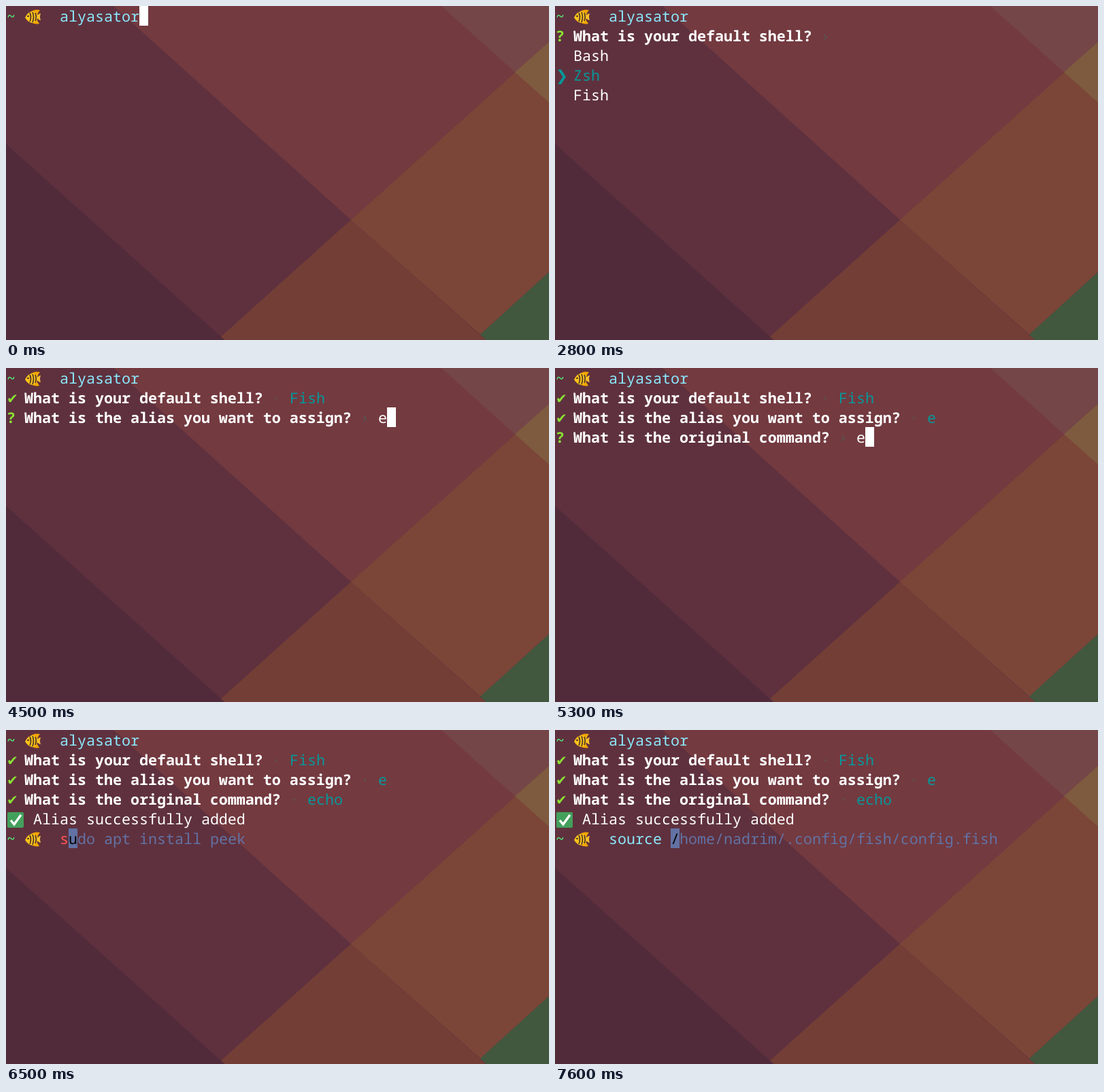
Recreate the animation shown at these times as an HTML page. Size 798 by 492 pixels, loop 8000 ms.

```html
<!DOCTYPE html>
<html lang="en">
<head>
<meta charset="utf-8">
<title>Terminal</title>
<style>
  html, body { margin: 0; width: 100%; height: 100%; overflow: hidden; background: #5f313e; }
  svg { display: block; width: 798px; height: 492px; }
  text {
    font: 500 21.667px "Noto Sans Mono", "DejaVu Sans Mono", monospace;
    font-variant-ligatures: none;
    text-rendering: geometricPrecision;
    white-space: pre;
    fill: #fff;
  }
  .bold { font-weight: 700; }
  .ok { fill: #8ae234; }
  .path { fill: #50fa7b; }
  .cmd { fill: #8be9fd; }
  .bad { fill: #ff5555; }
  .pick { fill: #06989a; }
  .dim { fill: #555753; font-weight: 400; }
  .ghost { fill: #6272a4; }
  .under { fill: #000; }
  .mark { font-family: "DejaVu Sans", sans-serif; font-weight: 400; }
  .tick { font-size: 20px; }
</style>
</head>
<body>
<svg viewBox="0 0 798 492" xmlns="http://www.w3.org/2000/svg">
  <defs>
    <g id="fish">
      <path d="M36 9Q41 4 50 6Q47 9 46 13L37 12Z" fill="#f2a600"/>
      <path d="M36 23Q42 28 49 26Q46 22 45 19Z" fill="#f2a600"/>
      <path d="M44 16Q48 11 51 11Q49 16 51 21Q48 21 44 16Z" fill="#fbc02d"/>
      <path d="M28 17Q32 8 40 8Q46 10 47 16Q45 23 39 25Q32 24 28 17Z" fill="#fcc21b"/>
      <g fill="none" stroke="#4a3328" stroke-width="1.7">
        <path d="M35 10Q38 16 35 23"/>
        <path d="M39 9Q42 16 39 24"/>
        <path d="M43 10Q45.500 16 43 22"/>
      </g>
      <circle cx="32.500" cy="15" r="1.300" fill="#3a2a24"/>
    </g>
    <g id="done">
      <rect x="2" y="121" width="24" height="23" rx="2" fill="#43a05c"/>
      <path d="M7 133L12 139L22 125" fill="none" stroke="#fff" stroke-width="3.400"/>
    </g>
  </defs>
  <g id="wall">
    <path d="M0 0H798V492H0Z" fill="#5f313e"/>
    <path d="M0 203L316 487L321.500 492H0Z" fill="#522b3b"/>
    <path d="M158 0H798V53L507 315Z" fill="#733a40"/>
    <path d="M640 0H798V53L748 97.500Z" fill="#754648"/>
    <path d="M316 487L507 315L705 492H321.500Z" fill="#733e36"/>
    <path d="M507 315L798 53V392L697 484Z" fill="#7b4638"/>
    <path d="M748 97.500L798 53V142Z" fill="#7e5b3f"/>
    <path d="M697 484L798 392V492H705.500Z" fill="#41583f"/>
  </g>
  <g id="screen"></g>
</svg>
<script>
const LOOP = 8000, CELL = 13, LINE = 29, LEFT = 1, BASE = 23;
const screen = document.getElementById('screen');
const items = [];

function add(tag, attrs, from = 0, to = LOOP) {
  const el = document.createElementNS('http://www.w3.org/2000/svg', tag);
  for (const key in attrs) el.setAttribute(key, attrs[key]);
  screen.append(el);
  items.push({ el, from, to });
  return el;
}

const colX = col => LEFT + col * CELL;

function put(row, col, str, cls, from, to) {
  add('text', { x: colX(col), y: row * LINE + BASE, class: cls }, from, to).textContent = str;
}

function cursor(row, col, from, to, fill = '#fff') {
  add('rect', { x: colX(col), y: row * LINE, width: CELL, height: LINE, fill }, from, to);
}

function prompt(row, from) {
  put(row, 0, '~', 'path', from);
  add('use', { href: '#fish', y: row * LINE }, from);
}

// A question with its pending and answered look
function ask(row, question, answer, from, answered) {
  const end = question.length + 3;
  put(row, 0, '?', 'ok bold', from, answered);
  put(row, 0, '✔', 'ok mark tick', answered);
  put(row, 2, question, 'bold', from);
  put(row, end, '›', 'dim', from, answered);
  put(row, end, '·', 'dim', answered);
  put(row, end + 2, answer, 'pick', answered);
  return end + 2;
}

// Typed answer: keys[i] is when character i appears
function type(row, col, str, from, keys, to) {
  [from, ...keys].forEach((start, n, all) => {
    const stop = all[n + 1] ?? to;
    put(row, col, str.slice(0, n), '', start, stop);
    cursor(row, col + n, start, stop);
  });
}

// Shell input with the suggested rest behind the cursor
function suggest(row, col, full, count, cls, from, to) {
  const at = col + count;
  put(row, col, full.slice(0, count), cls, from, to);
  cursor(row, at, from, to, '#6272a4');
  put(row, at, full[count], 'under', from, to);
  put(row, at + 1, full.slice(count + 1), 'ghost', from, to);
}

prompt(0, 0);
put(0, 6, 'alyasator', 'cmd');
cursor(0, 15, 0, 500);

ask(1, 'What is your default shell?', 'Fish', 500, 3400);
const shells = ['Bash', 'Zsh', 'Fish'];
const moves = [[500, 0], [1600, 1], [2600, 2], [2800, 1], [3100, 2]];
moves.forEach(([from, chosen], i) => {
  const to = moves[i + 1]?.[0] ?? 3400;
  shells.forEach((name, n) => put(n + 2, 2, name, n === chosen ? 'pick' : '', from, to));
  put(chosen + 2, 0, '❯', 'pick mark', from, to);
});

const aliasCol = ask(2, 'What is the alias you want to assign?', 'e', 3400, 4700);
type(2, aliasCol, 'e', 3400, [4500], 4700);

const commandCol = ask(3, 'What is the original command?', 'echo', 4700, 6100);
type(3, commandCol, 'echo', 4700, [5300, 5400, 5600, 5700], 6100);

add('use', { href: '#done' }, 6100);
put(4, 3, 'Alias successfully added', '', 6100);
prompt(5, 6100);
cursor(5, 6, 6100, 6500);
suggest(5, 6, 'sudo apt install peek', 1, 'bad', 6500, 6700);
const keys = [6700, 6800, 6900, 7200, 7300, 7600];
keys.forEach((from, i) => suggest(5, 6, 'source /home/nadrim/.config/fish/config.fish',
  i + 2, from < 7300 ? 'bad' : 'cmd', from, keys[i + 1] ?? LOOP));

function draw() {
  const t = performance.now() % LOOP;
  for (const { el, from, to } of items) {
    el.style.display = t >= from && t < to ? '' : 'none';
  }
  requestAnimationFrame(draw);
}
draw();
</script>
</body>
</html>
```
